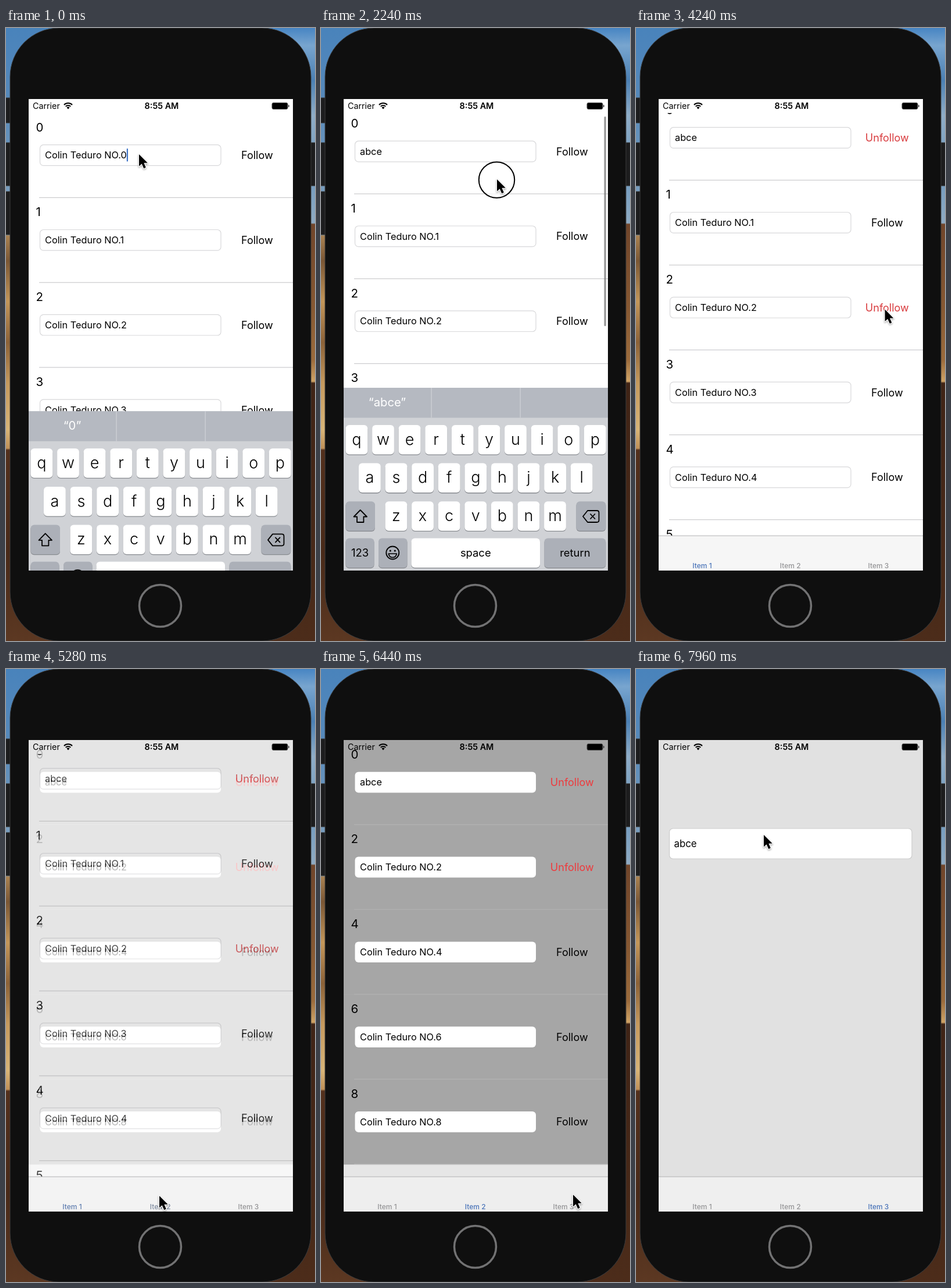
These frames come from a looping animation (532x1053 px, 8 s). An HTML page with a canvas:

```html
<!DOCTYPE html>
<html lang="en">
<head>
<meta charset="utf-8">
<style>
html, body { margin: 0; width: 532px; height: 1053px; overflow: hidden; background: #0f0f0f; }
canvas { display: block; }
</style>
</head>
<body>
<canvas id="stage" width="532" height="1053"></canvas>
<script>
const LOOP = 8000, W = 532, H = 1053, PITCH = 145.8;
const NAME = 'Colin Teduro NO.';
const stage = document.getElementById('stage').getContext('2d');
const layer = document.createElement('canvas');
layer.width = W;
layer.height = H;
const buffer = layer.getContext('2d');
let c = stage;

// Each row: time, then values
const CURSOR = [
  [0, 229, 217], [1560, 229, 217], [1920, 303, 266.5], [2120, 303, 266.5], [2240, 303, 260],
  [2460, 303, 236.5], [2840, 405, 209], [3000, 430, 190], [3300, 430, 190], [3900, 430, 480],
  [4200, 430, 480], [4960, 264, 905], [5400, 264, 905], [6200, 434, 903], [6700, 434, 903],
  [7600, 220, 285]
];
const SCROLL = [[2120, 0], [2240, 6.5], [2460, 30]];
const PRESSES = [[1960, 2480], [3040, 3160], [4000, 4120], [5120, 5240], [6480, 6600]];
const SWITCHES = [5240, 6600];
const FOLLOWED = { 0: 3160, 2: 4120 };

const clamp = v => Math.max(0, Math.min(1, v));
const mix = (a, b, k) => a + (b - a) * k;

function track(keys, t) {
  if (t <= keys[0][0]) return keys[0].slice(1);
  const i = keys.findIndex(key => key[0] > t);
  if (i < 0) return keys[keys.length - 1].slice(1);
  const a = keys[i - 1], b = keys[i];
  const k = (t - a[0]) / (b[0] - a[0]), e = k * k * (3 - 2 * k);
  return a.slice(1).map((v, j) => mix(v, b[j + 1], e));
}

function rect(x, y, w, h, color) {
  c.fillStyle = color;
  c.fillRect(x, y, w, h);
}

function box(x, y, w, h, r, fill, stroke, width = 1.2) {
  c.beginPath();
  c.roundRect(x, y, w, h, r);
  if (fill) { c.fillStyle = fill; c.fill(); }
  if (stroke) { c.strokeStyle = stroke; c.lineWidth = width; c.stroke(); }
}

function circle(x, y, r, fill, stroke, width) {
  box(x - r, y - r, 2 * r, 2 * r, r, fill, stroke, width);
}

// y is the middle of the capital letters
function text(s, x, y, size, color = '#000', align = 'left', weight = 400) {
  c.font = `${weight} ${size}px Inter, Roboto, sans-serif`;
  c.textAlign = align;
  c.fillStyle = color;
  c.fillText(s, x, y + size * .36);
}

function lines(path, width, color = '#000') {
  c.strokeStyle = color;
  c.lineWidth = width;
  c.lineJoin = 'round';
  c.stroke(new Path2D(path));
}

function gradient(x, w, stops) {
  const g = c.createLinearGradient(0, 0, 0, H);
  stops.forEach(([y, color]) => g.addColorStop(y / H, color));
  rect(x, 0, w, H, g);
}

function phone() {
  gradient(0, 266, [[0, '#4983bb'], [120, '#5689bb'], [355, '#88a5bd'], [357, '#a98252'],
    [400, '#7b5735'], [470, '#c4975a'], [540, '#8c6238'], [610, '#c69a5e'], [690, '#d8b578'],
    [722, '#c09158'], [725, '#53301d'], [900, '#492a19'], [H, '#5c3822']]);
  gradient(266, 266, [[0, '#4785c3'], [30, '#78a5cf'], [90, '#4b80b4'], [150, '#8fadc7'],
    [250, '#6f99be'], [335, '#8fabc3'], [337, '#70452a'], [480, '#865832'], [570, '#9b6b3c'],
    [607, '#d0a466'], [610, '#402416'], [H, '#4c2c1a']]);
  for (const [x, y, h] of [[-5, 120, 43], [-5, 197, 74], [-5, 281, 74], [521, 197, 74]])
    box(x, y, 16, h, 3, '#1d1d1e', '#343435', 1);
  box(7, 0, 518, 1053, 84, '#0f0f0f', '#3c3c3d', 1);
  circle(265.5, 992.5, 36, null, '#727273', 3.5);
}

function fieldText(t) {
  if (t < 880) {
    const full = NAME + '0';
    return full.slice(0, Math.ceil(full.length * (1 - clamp((t - 320) / 440))));
  }
  return 'abce'.slice(0, [880, 980, 1080, 1240].filter(at => t >= at).length);
}

function rows(t, top, even) {
  for (let i = 0; i < 6 - even; i++) {
    const id = even ? i * 2 : i, y = top + i * PITCH;
    if (even) rect(39, y, 455, PITCH + .5, '#a6a6a6');
    rect(57, y + PITCH - .7, 437, 1.2, even ? '#bcbcbc' : '#cbcbcd');
    text(id, 51.5, y + 24.5, 20.5);
    box(58.5, y + 55, 311.5, 35.7, 6, '#fff', even ? null : '#d8d8da');
    const value = id ? NAME + id : fieldText(t);
    text(value, 67, y + 72.8, 16.3);
    if (!id && t < 2120)
      rect(67 + c.measureText(value).width, y + 61.5, 2.2, 22, '#3f74c8');
    const on = t >= FOLLOWED[id];
    text(on ? 'Unfollow' : 'Follow', 432.3, y + 73, 18,
      on ? (even ? '#ee3a3d' : '#d93c3f') : '#000', 'center');
  }
}

function scrollBar(t) {
  const alpha = clamp((t - 2120) / 60) * clamp((2920 - t) / 260);
  if (!alpha) return;
  const k = clamp((t - 2240) / 300);
  const y = mix(152, 149, k), bottom = mix(511, 868, k);
  box(487.4, y, 3.4, bottom - y, 1.7, `rgba(110,110,110,${.7 * alpha})`);
}

function tabBar(tab) {
  rect(39, 872, 455, 60, ['#f6f6f6', '#eeeeee', '#efefef'][tab]);
  rect(39, 871.7, 455, 1, '#b2b2b4');
  for (let i = 0; i < 3; i++)
    text('Item ' + (i + 1), 114 + i * 151.7, 923.5, 12, i === tab ? '#4a74b9' : '#949496', 'center', 500);
}

function statusBar() {
  text('Carrier', 46, 134, 14.3);
  text('8:55 AM', 268, 134, 14.4, '#000', 'center', 600);
  c.strokeStyle = '#000';
  c.lineWidth = 2;
  for (const r of [6, 10]) {
    c.beginPath();
    c.arc(107, 139, r, -Math.PI * .75, -Math.PI * .25);
    c.stroke();
  }
  c.beginPath();
  c.moveTo(107, 139.5);
  c.arc(107, 139, 3.5, -Math.PI * .75, -Math.PI * .25);
  c.fillStyle = '#000';
  c.fill();
  box(458, 128.4, 27, 11, 2.5, '#000', '#555', 1);
  box(486, 132, 1.6, 4, 1, '#444');
}

function key(x, y, w, label, dark, size = 27, weight = 300) {
  box(x, y + 1.3, w, 50.5, 6, '#888b90');
  box(x, y, w, 50.5, 6, dark ? '#acb0b8' : '#fff');
  if (label) text(label, x + w / 2, y + (size > 20 ? 24 : 24.5), size, '#000', 'center', weight);
}

function suggestions(t) {
  if (t < 320) return ['“0”'];
  if (t < 940) return [];
  if (t < 1160) return ['“a”', 'and', 'all'];
  return t < 1320 ? ['“abc”'] : ['“abce”'];
}

function keyboard(t) {
  const out = clamp((t - 2250) / 400);
  const drop = t < 1000 ? 41 * Math.exp(-t / 60) : 314 * (1 - (1 - out) ** 3);
  if (out === 1) return;
  c.save();
  c.translate(0, drop);
  rect(39, 618, 455, 314, '#d0d2d6');
  rect(39, 618, 455, 51.5, '#b5b9c1');
  rect(189.5, 618, 1.2, 51.5, '#d0d3d8');
  rect(342.5, 618, 1.2, 51.5, '#d0d3d8');
  suggestions(t).forEach((s, i) => text(s, 114 + i * 152.2, 642.5, 20.3, '#fff', 'center'));
  [['qwertyuiop', 42.5], ['asdfghjkl', 65], ['zxcvbnm', 110.5]].forEach(([letters, x], row) =>
    [...letters].forEach((ch, i) => key(x + i * 45.6, 682 + row * 65.6, 37.8, ch)));
  key(42.5, 813.2, 50.5, '', true);
  key(439.5, 813.2, 50.8, '', true);
  key(42.5, 876.5, 49, '123', true, 18.5, 400);
  key(99, 876.5, 49.5, '', true);
  key(155.5, 876.5, 221.5, 'space', false, 18.4, 400);
  key(384.5, 876.5, 105.8, 'return', true, 18.4, 400);
  lines('M67.7 828 L56.5 839.5 H62 V849 H73.4 V839.5 H79 Z', 1.8);
  lines('M459 829 H475 Q478.5 829 478.5 832.5 V845.5 Q478.5 849 475 849 H459 L451 839 Z M463.5 834.5 L472 843.5 M472 834.5 L463.5 843.5', 1.8);
  circle(123.3, 901.5, 11, null, '#000', 1.8);
  circle(119.3, 898, 1.6, '#000');
  circle(127.3, 898, 1.6, '#000');
  lines('M116.3 903 H130.3 Q129 909.5 123.3 909.5 Q117.6 909.5 116.3 903 Z', 1.6);
  c.restore();
}

function page(tab, t) {
  rect(39, 122, 455, 810, ['#fff', '#e6e6e6', '#e1e1e1'][tab]);
  if (tab === 0) {
    rows(t, 145.7 - track(SCROLL, t)[0], 0);
    scrollBar(t);
    rect(39, 122, 455, 24, '#fff');
  } else if (tab === 1) {
    rows(t, 121.8, 1);
  } else {
    box(57.5, 274, 417.5, 52, 6, '#fff', '#cdcdcd');
    text('abce', 65.5, 300, 16.8);
  }
  tabBar(tab);
  if (tab === 0) keyboard(t);
  statusBar();
}

function pointer(t) {
  const [x, y] = track(CURSOR, t);
  if (PRESSES.some(([from, to]) => t >= from && t < to))
    circle(x - .5, y + 1, 30.7, 'rgba(255,255,255,.75)', '#000', 2);
  const arrow = new Path2D('M0 0 V20.5 L4.7 16.2 L8.3 24.2 L11.8 22.6 L8.4 14.8 H14.8 Z');
  c.save();
  c.translate(x, y);
  c.shadowColor = 'rgba(0,0,0,.35)';
  c.shadowBlur = 3;
  c.shadowOffsetY = 1.5;
  c.lineWidth = 2.4;
  c.lineJoin = 'round';
  c.strokeStyle = '#fff';
  c.stroke(arrow);
  c.shadowColor = 'transparent';
  c.fillStyle = '#000';
  c.fill(arrow);
  c.restore();
}

function draw(t) {
  phone();
  c.save();
  c.beginPath();
  c.rect(39, 122, 455, 810);
  c.clip();
  const tab = SWITCHES.filter(at => t >= at).length;
  const fade = tab ? clamp((t - SWITCHES[tab - 1]) / 145) : 1;
  page(fade < 1 ? tab - 1 : tab, t);
  if (fade < 1) {
    c = buffer;
    page(tab, t);
    c = stage;
    c.globalAlpha = fade;
    c.drawImage(layer, 0, 0);
  }
  c.restore();
  pointer(t);
}

const start = performance.now();
function tick() {
  draw((performance.now() - start) % LOOP);
  requestAnimationFrame(tick);
}
tick();
</script>
</body>
</html>
```
